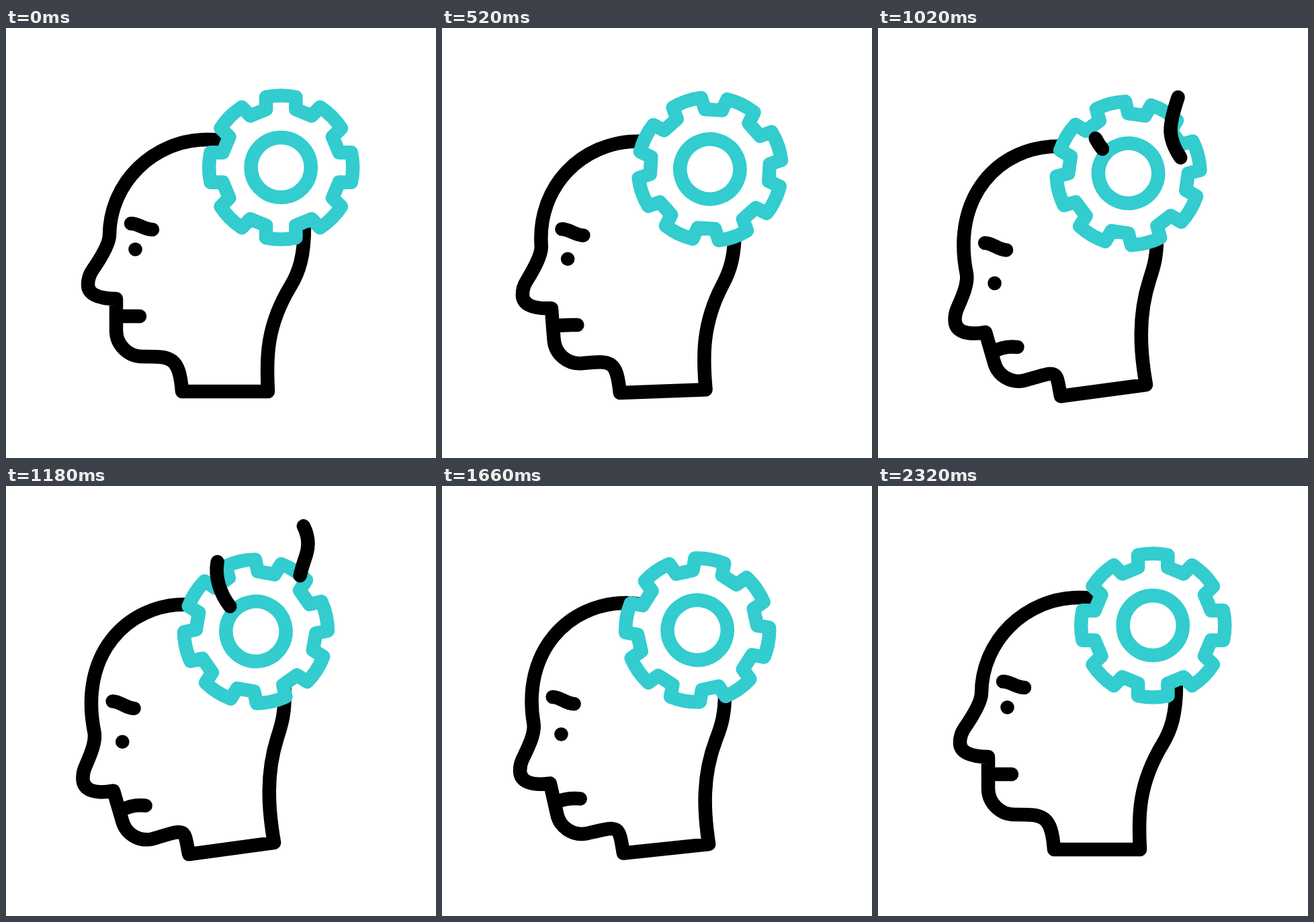
An HTML page that plays this animation: 640 by 640 pixels, repeating every 2400 ms.

```html
<!DOCTYPE html>
<html>
<head>
<meta charset="utf-8">
<style>
  html, body { margin: 0; height: 100%; overflow: hidden; background: #fff; }
  svg { display: block; width: 100vw; height: 100vh; }
</style>
</head>
<body>
<svg viewBox="0 0 640 640" fill="none" stroke="#000" stroke-width="20.5" stroke-linecap="round" stroke-linejoin="round">
  <path id="head"/>
  <path id="mouth"/>
  <path id="brow"/>
  <circle id="eye" r="10.3" fill="#000" stroke="none"/>
  <g id="gear" stroke="#33cccf">
    <path id="teeth" fill="#fff"/>
    <circle r="44.6"/>
  </g>
  <path id="longWisp" pathLength="1" d="M451 194C430 163 432 146 447 102C452 86 449 71 442 58"/>
  <path id="shortWisp" pathLength="1" d="M334 180C318 160 309 132 316 107"/>
</svg>
<script>
const LOOP = 2400, TURN = 1200, END = 2333;
const $ = id => document.getElementById(id);

// Each shape has an upright and a bowed pose with matching points.
const poses = {
  head: [
    `M330 170C320 167 310 166 300 166C219 166 154.5 231 154 308C154 322 140 344 129 360
     C124 367 122 373 122 382C122 395 135 403 164 403L164 450C164 472 182 489 203 489
     C245 489 258 488 262 541L390 541C387 490 388 443 423 385C436 364 444 340 444 295`,
    `M300 182C290 178 280 176 268 176C181 176 108 250 132 367C134 384 123 405 117 420
     C115 425 114.5 430 114.5 435C115 452 132 458 160 453L173 498C178 517 197 529 217 525
     C270 510 264 507 272 548L399 531C390 480 387 428 404 375C411 354 416 338 415 300`
  ],
  mouth: ["M164 429C176 429 188 429 199 429", "M174 481C186 474 197 474 207.5 475"],
  brow: ["M186 291C197 291 206 300 218 300", "M159 320C170 320 180 331 191 330.5"]
};

const clamp = x => Math.min(1, Math.max(0, x));
const mix = (a, b, k) => a + (b - a) * k;
const smooth = x => x * x * (3 - 2 * x);
const span = (t, from, to) => clamp((t - from) / (to - from));

// Bezier easing with horizontal handles at x = a and x = b.
function ease(x, a = 0.75, b = 0.25) {
  let lo = 0, hi = 1;
  for (let i = 0; i < 24; i++) {
    const u = (lo + hi) / 2, v = 1 - u;
    if (3 * a * u * v * v + 3 * b * u * u * v + u * u * u < x) lo = u; else hi = u;
  }
  return smooth(lo);
}

function morph([from, to], k) {
  const targets = to.match(/[\d.]+/g);
  let i = 0;
  return from.replace(/[\d.]+/g, n => mix(+n, +targets[i++], k).toFixed(2));
}

function gearPath() {
  const at = (deg, r) => {
    const a = deg * Math.PI / 180;
    return `${r * Math.sin(a)} ${-r * Math.cos(a)}`;
  };
  let d = "";
  for (let a = 0; a < 360; a += 45) {
    d += `${a ? "L" : "M"}${at(a - 14.3, 89.3)}L${at(a - 12, 107)}` +
         `A107 107 0 0 1 ${at(a + 12, 107)}L${at(a + 14.3, 89.3)}`;
  }
  return d + "Z";
}

function trim(path, start, end) {
  const visible = end > start;
  path.style.display = visible ? "" : "none";
  if (!visible) return;
  path.setAttribute("stroke-dasharray", `${end - start} 9`);
  path.setAttribute("stroke-dashoffset", -start);
}

function draw(t) {
  const down = span(t, 0, TURN), up = span(t, TURN, END);
  const bow = 1.014 * (ease(down) - ease(up));
  for (const id in poses) $(id).setAttribute("d", morph(poses[id], bow));
  $("eye").setAttribute("cx", mix(192.5, 173.5, bow));
  $("eye").setAttribute("cy", mix(329.5, 380, bow));

  const angle = 122.5 * ease(down, 0.83, 0.23) + 102.5 * ease(up);
  $("gear").setAttribute("transform",
    `translate(${mix(409.2, 372.5, bow)} ${mix(207.5, 216.3, bow)}) rotate(${angle})`);

  trim($("longWisp"), smooth(span(t, 1000, 1387)), smooth(span(t, 707, 1215)));
  trim($("shortWisp"), smooth(span(t, 1160, 1460)), smooth(span(t, 920, 1235)));
}

$("teeth").setAttribute("d", gearPath());
const began = performance.now();
function tick() {
  draw((performance.now() - began) % LOOP);
  requestAnimationFrame(tick);
}
tick();
</script>
</body>
</html>
```
